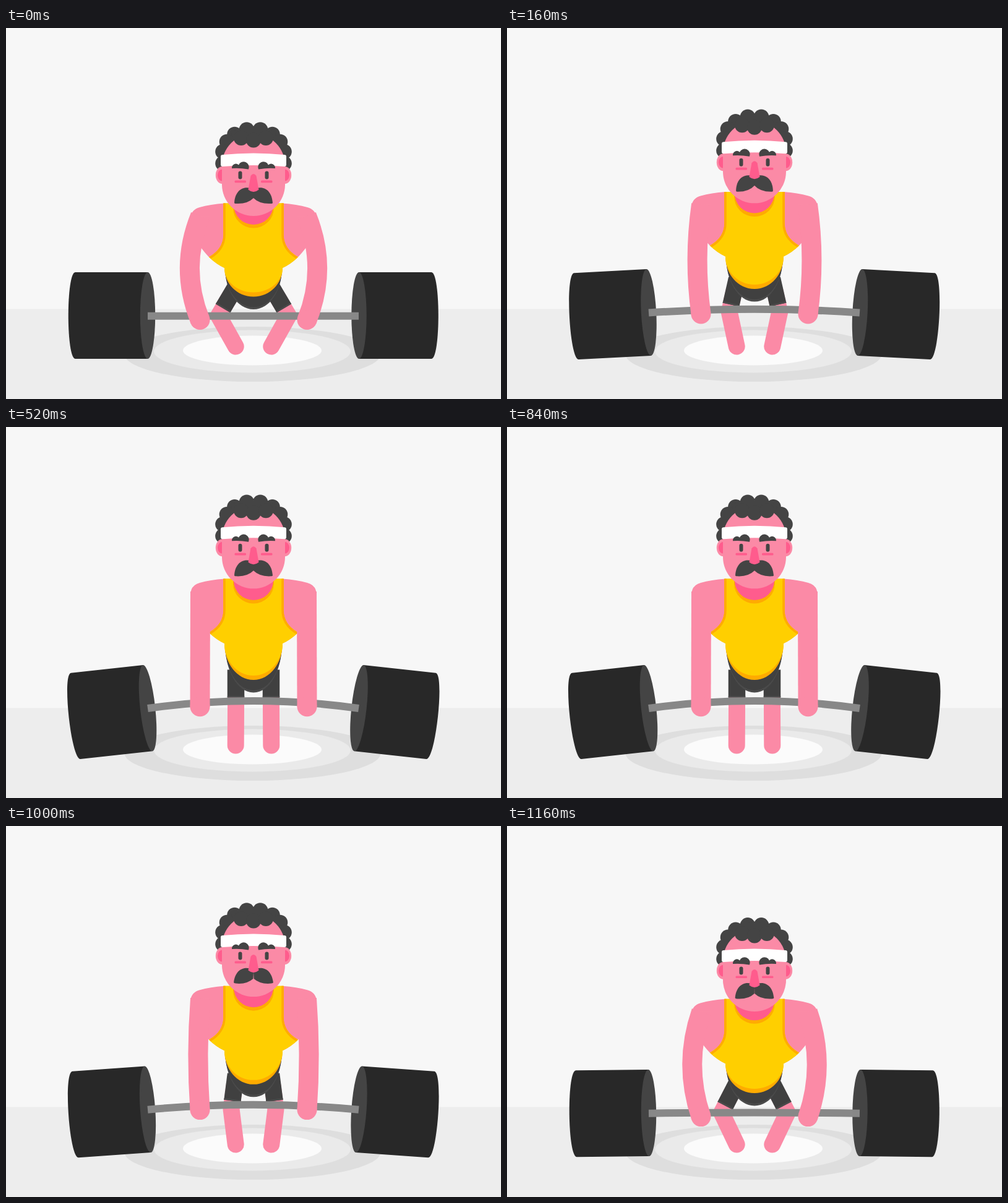
These frames come from a looping animation (800x600 px, 1200 ms). An HTML page:

```html
<!DOCTYPE html>
<html>
<head>
<meta charset="utf-8">
<title>Weightlifter</title>
<style>
html, body { margin: 0; height: 100%; overflow: hidden; background: #f7f7f7; }
svg { display: block; width: 800px; height: 600px; }
</style>
</head>
<body>
<svg viewBox="0 0 800 600">
  <path fill="#ededed" d="M0 454.5H800V600H0z"/>
  <ellipse cx="398.5" cy="527.5" rx="207" ry="44.5" fill="#dedede"/>
  <ellipse cx="398" cy="523" rx="159" ry="34.5" fill="#eaeaea"/>
  <ellipse cx="398" cy="521.5" rx="112" ry="24" fill="#fbfbfb"/>
  <g id="lifter"></g>
</svg>
<script>
const LOOP = 1200, STEP = 40;
const SKIN = '#fb8aa6', BLUSH = '#ff5c8d', DARK = '#444', SHORTS = '#404040', HEM = '#4b4b4b',
      YELLOW = '#ffcf00', ORANGE = '#ffab00';
const lifter = document.getElementById('lifter');

const fill = (d, color) => `<path d="${d}" fill="${color}"/>`;
const line = (d, color, width, cap = 'butt') =>
  `<path d="${d}" fill="none" stroke="${color}" stroke-width="${width}" stroke-linecap="${cap}" stroke-linejoin="round"/>`;
const oval = (x, y, rx, ry, color) =>
  `<ellipse cx="${x}" cy="${y}" rx="${rx}" ry="${ry}" fill="${color}"/>`;
const bar = (x, y, w, h, r, color) =>
  `<rect x="${x}" y="${y}" width="${w}" height="${h}" rx="${r}" fill="${color}"/>`;
const group = (transform, s) => `<g transform="${transform}">${s}</g>`;
const both = (s, width = 800) => s + group(`matrix(-1 0 0 1 ${width} 0)`, s);
const curls = (points, r) => points.map(([x, y]) => oval(x, y, r, r, DARK)).join('');
const wave = x => Math.sin(x * Math.PI / 2) ** 2;

// 0 = crouched, 1 = standing
function lift(t) {
  if (t < 326) return wave(t / 326);
  return t < 840 ? 1 : 1 - wave((t - 840) / 400);
}

// The moustache lags behind the head
function swing(t) {
  if (t < 520) return 4 * Math.sin(Math.PI * t / 520);
  return t < 840 ? 0 : -3 * Math.sin(Math.PI * (t - 840) / 360);
}

function leg(p) {
  const bend = 28 * (1 - p) ** 1.25;
  const kneeX = 371.5 - bend, kneeY = 515 - Math.sqrt(57 ** 2 - bend ** 2);
  const hipY = 418 - 25.5 * p;
  const dx = kneeX - 371.5, dy = kneeY - hipY, len = Math.hypot(dx, dy);
  const at = d => `${371.5 + dx / len * d} ${hipY + dy / len * d}`;
  const end = 41 + 4 * p;
  return line(`M${at(20)}L${kneeX} ${kneeY}L371.2 515`, SKIN, 27, 'round') +
    line(`M${at(0)}L${at(end)}`, SHORTS, 27.5) +
    line(`M${at(end - 2.5)}L${at(end)}`, HEM, 27.5);
}

function barbell(p) {
  const y = 465.7 - 10.7 * p;
  const plate = fill('M112 395H229V535H112C97 535 97 395 112 395z', '#282828') +
    oval(229, 465, 12.2, 70, DARK);
  return both(group(`translate(0 ${-10.3 * p}) rotate(${-6.2 * p} 229 465)`, plate), 799.5) +
    line(`M229 ${y}Q399.5 ${y - 24 * p} 570 ${y}`, '#888', 12);
}

function torso(p) {
  const hem = 434.5 + 12.5 * p;
  const bowl = (x, bottom) =>
    `C${x} ${388 + .53 * (bottom - 388)} 373 ${bottom} 400 ${bottom}`;
  const pelvis = bottom => `M400 380H354V388${bowl(354, bottom)}z`;
  const shirt = bottom =>
    `M400 283.5H351.5V334C351.5 350 344 361 328 370.5Q340 382 353 388${bowl(353, bottom)}z`;
  return both(
    fill(pelvis(hem + 20.5), HEM) + fill(pelvis(hem + 17), SHORTS) +
    fill('M353 283.5Q330 285 313 290Q300 293.5 298.3 306L306 342Q317 359 328 370.5L353 384z', SKIN) +
    fill(shirt(hem), ORANGE) + fill(shirt(hem - 7), YELLOW) +
    line('M353 283.5V334C353 350 346 362 330 371.5', ORANGE, 3.5)
  ) +
    fill('M367 283.5V290.5a33 33 0 0 0 66 0V283.5z', ORANGE) +
    fill('M368 283.5V286a32 32 0 0 0 64 0V283.5z', BLUSH);
}

function arm(p) {
  const sag = 34 * (1 - p) ** 1.5;
  const top = 304 - 38 * p, hand = 472 - 19.7 * p;
  return line(`M314 ${top}V${top + .1}`, SKIN, 32) +
    line(`M314 ${top}Q${314 - sag} ${(top + hand) / 2} 313.5 ${hand}`, SKIN, 32) +
    oval(313.5, hand, 16, 16, SKIN);
}

function head(angle) {
  const moustache = fill(
    'M400 262C392 255 371 256 369 282.5Q369 284 372 284Q390 285 400 275z', DARK);
  return oval(400, 205, 54, 45, DARK) +
    both(
      curls([[389, 164.5], [369.5, 172], [357, 184], [350.5, 200], [350.5, 219]], 12.3) +
      oval(349.5, 238, 10.7, 14, SKIN) + oval(349.5, 238, 7.5, 9.5, BLUSH)
    ) +
    bar(349, 171, 102, 133, 51, SKIN) +
    oval(400, 172, 36, 12, DARK) + curls([[380, 178], [400, 181.5], [420, 178]], 12) +
    fill('M350 205Q400 200 450 205q3 0 3 3V221q0 3-3 3Q400 220 350 224q-3 0-3-3V208q0-3 3-3z', '#fff') +
    both(
      fill('M365 227a6.5 7 0 0 1 11-5.5a8.5 8.5 0 0 1 16 7Q378 226 365 227z', DARK) +
      bar(375.5, 231.5, 6, 13, 3, DARK) +
      bar(369.5, 246.5, 18.5, 3.7, 1.5, BLUSH) +
      group(`rotate(${-angle} 400 264)`, moustache)
    ) +
    fill('M395.5 239q4.5-6 9 0L408.5 261.5q-8.5 7-17 0z', BLUSH);
}

function draw(now) {
  const t = Math.floor(now % LOOP / STEP) * STEP;
  const p = lift(t);
  lifter.innerHTML = both(leg(p)) + barbell(p) +
    group(`translate(0 ${-38 * p})`, torso(p)) +
    both(arm(p)) +
    group(`translate(0 ${-42.7 * p})`, head(swing(t)));
  requestAnimationFrame(draw);
}
draw(0);
</script>
</body>
</html>
```
